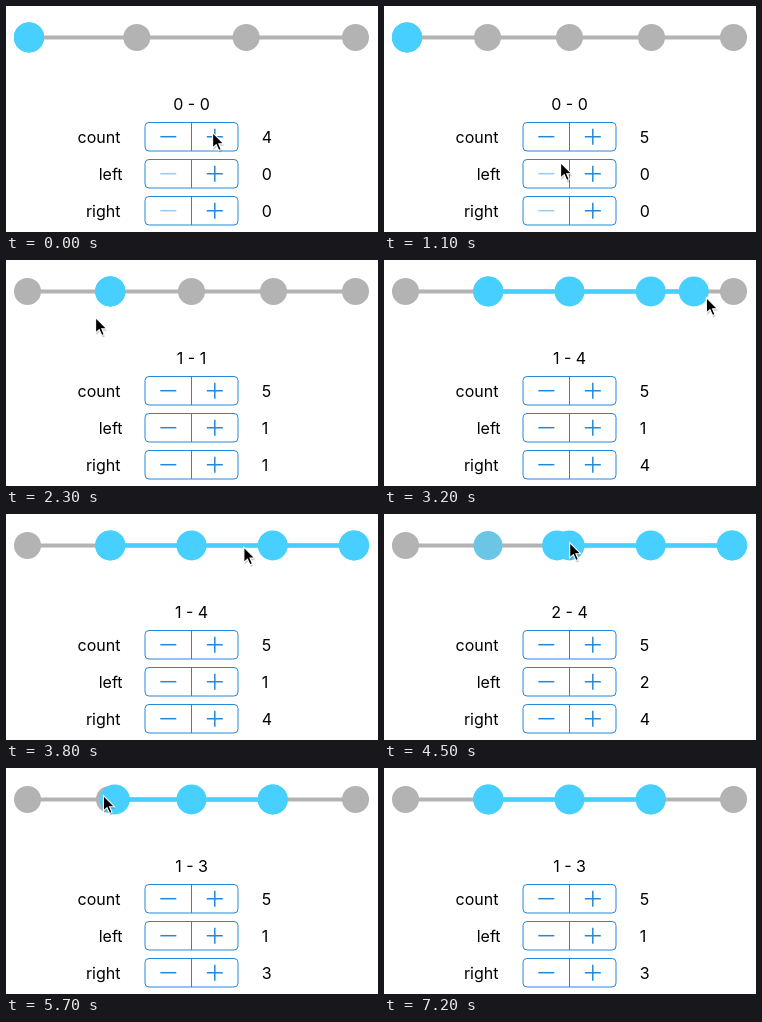
These frames come from a looping animation (372x226 px, 8200 ms). An HTML page:

```html
<!DOCTYPE html>
<html>
<head>
<meta charset="utf-8">
<style>
  html, body { margin: 0; width: 100%; height: 100%; overflow: hidden; background: #fff; }
  svg { display: block; }
  text { font: 16px Inter, "Liberation Sans", sans-serif; fill: #000; }
  .stepper { fill: none; stroke: #2488da; stroke-width: 1; }
  .sign { stroke-width: 1.5; }
</style>
</head>
<body>
<svg id="stage" width="372" height="226" viewBox="0 0 372 226"></svg>
<script>
const LOOP = 8200, STEP = 100, FADE = 300, LEAD = 12;
const BLUE = [71, 207, 255], GREY = [179, 179, 179];
const rgb = c => `rgb(${c.map(Math.round)})`;
const mix = (a, b, k) => a + (b - a) * k;
const knobX = (pos, last = 4) => 23 + 325 * pos / last;
const dotX = (i, last) => 21.5 + 328 * i / last;

// Tracks hold [time, ...values]; knob positions count slider steps.
const left = [[0, 0]], right = [[0, 0]], cursor = [];
const point = (t, x, y) => cursor.push([t, x, y]);

// The pointer settles at the grip, then runs ahead of the knob.
function drag(knob, start, end, to, y) {
  const from = knob.at(-1)[1], lead = Math.sign(to - from) * LEAD;
  knob.push([start, from], [end, to]);
  point(start - STEP, knobX(from) + lead, y);
  point(start, knobX(from) + lead, y);
  point(end, knobX(to) + lead, y);
}

point(700, 206, 126);
point(1100, 176, 156);
drag(right, 1400, 1600, 1, 34);
drag(left, 1900, 2100, 1, 38);
point(2300, 89, 57);
drag(right, 2700, 3293, 4, 37);
drag(left, 4400, 4518, 2, 28);
drag(right, 5100, 5350, 3, 28);
drag(left, 5500, 5750, .82, 27);
left.push([6100, .82], [6200, 1]);
point(6100, 77, 27);
point(6500, 160, 189);
point(7000, 160, 189);
point(7100, 178, 200);

function at(track, t) {
  const next = track.findIndex(key => key[0] > t);
  if (next === 0) return track[0].slice(1);
  if (next < 0) return track.at(-1).slice(1);
  const [t0, ...a] = track[next - 1], [t1, ...b] = track[next];
  return a.map((v, i) => mix(v, b[i], (t - t0) / (t1 - t0)));
}

const stage = document.getElementById("stage");
function add(tag, attrs, text = "") {
  const node = document.createElementNS("http://www.w3.org/2000/svg", tag);
  set(node, attrs);
  node.textContent = text;
  return stage.appendChild(node);
}
function set(node, attrs) {
  for (const name in attrs) node.setAttribute(name, attrs[name]);
}
const circle = () => add("circle", { cy: 31.4, r: 15, fill: rgb(BLUE) });

add("rect", { x: 21, y: 29.5, width: 328, height: 4, fill: rgb(GREY) });
const range = add("rect", { y: 29.3, height: 4.4, fill: rgb(BLUE) });
const dots = Array.from({ length: 5 }, circle);
const knobs = [circle(), circle()];

const title = add("text", { x: 185.5, y: 104, "text-anchor": "middle" });
const press = add("rect", { x: 186, y: 117, width: 46, height: 28, fill: "#1c86d6" });
const rows = ["count", "left", "right"].map((name, i) => {
  const y = 131 + 37 * i;
  add("text", { x: name === "left" ? 116.5 : 114.5, y: y + 6, "text-anchor": "end" }, name);
  add("rect", { class: "stepper", x: 139, y: y - 14.5, width: 93, height: 28.5, rx: 4 });
  add("path", { class: "stepper", d: `M185.5 ${y - 14.5}v28.5` });
  add("path", { class: "stepper sign", d: `M200.8 ${y - .3}h16m-8 -8v16` });
  return {
    minus: add("path", { class: "stepper sign", d: `M154.3 ${y - .3}h16` }),
    value: add("text", { x: 255.8, y: y + 6 })
  };
});

const arrow = "M.6 .6V16L4.2 12.7L6.8 18.4L9.2 17.4L6.8 11.7H11.6Z";
const shadow = add("path", { d: arrow, fill: "#000", opacity: .2 });
const pointer = add("path", { d: arrow, fill: "#000", stroke: "#fff", "stroke-width": 1.1 });

const covers = (i, t) => i >= at(left, t)[0] - 1e-6 && i <= at(right, t)[0] + 1e-6;

// A dot lights up at once and fades out over FADE.
function glow(i, t) {
  if (covers(i, t)) return 1;
  let lit = 0;
  for (let ago = 0; ago < FADE; ago += 25) lit += covers(i, Math.max(0, t - ago));
  return lit * 25 / FADE;
}

function draw(t) {
  const count = t < 300 ? 4 : 5, last = count - 1;
  const ends = [at(left, t)[0], at(right, t)[0]];
  const xs = ends.map(pos => knobX(pos, last));
  const [low, high] = ends.map(Math.round);

  knobs.forEach((knob, i) => set(knob, { cx: xs[i] }));
  set(range, { x: xs[0], width: Math.max(0, xs[1] - xs[0]) });
  dots.forEach((dot, i) => {
    const k = glow(i, t);
    set(dot, {
      cx: mix(dotX(i, last), knobX(i, last), k),
      r: mix(13.5, 15, k),
      fill: rgb(GREY.map((c, j) => mix(c, BLUE[j], k))),
      visibility: i < count ? "visible" : "hidden"
    });
  });

  title.textContent = `${low} - ${high}`;
  [count, low, high].forEach((value, i) => {
    rows[i].value.textContent = value;
    set(rows[i].minus, { opacity: value ? 1 : .45 });
  });
  set(press, { opacity: t < 300 || t >= 600 ? 0 : t < 500 ? .2 : .1 });

  const [x, y] = at(cursor, t), visibility = t < 7200 ? "visible" : "hidden";
  set(pointer, { transform: `translate(${x} ${y})`, visibility });
  set(shadow, { transform: `translate(${x + .7} ${y + 2})`, visibility });
}

function tick() {
  draw(Math.floor(performance.now() % LOOP / STEP) * STEP);
  requestAnimationFrame(tick);
}
tick();
</script>
</body>
</html>
```
